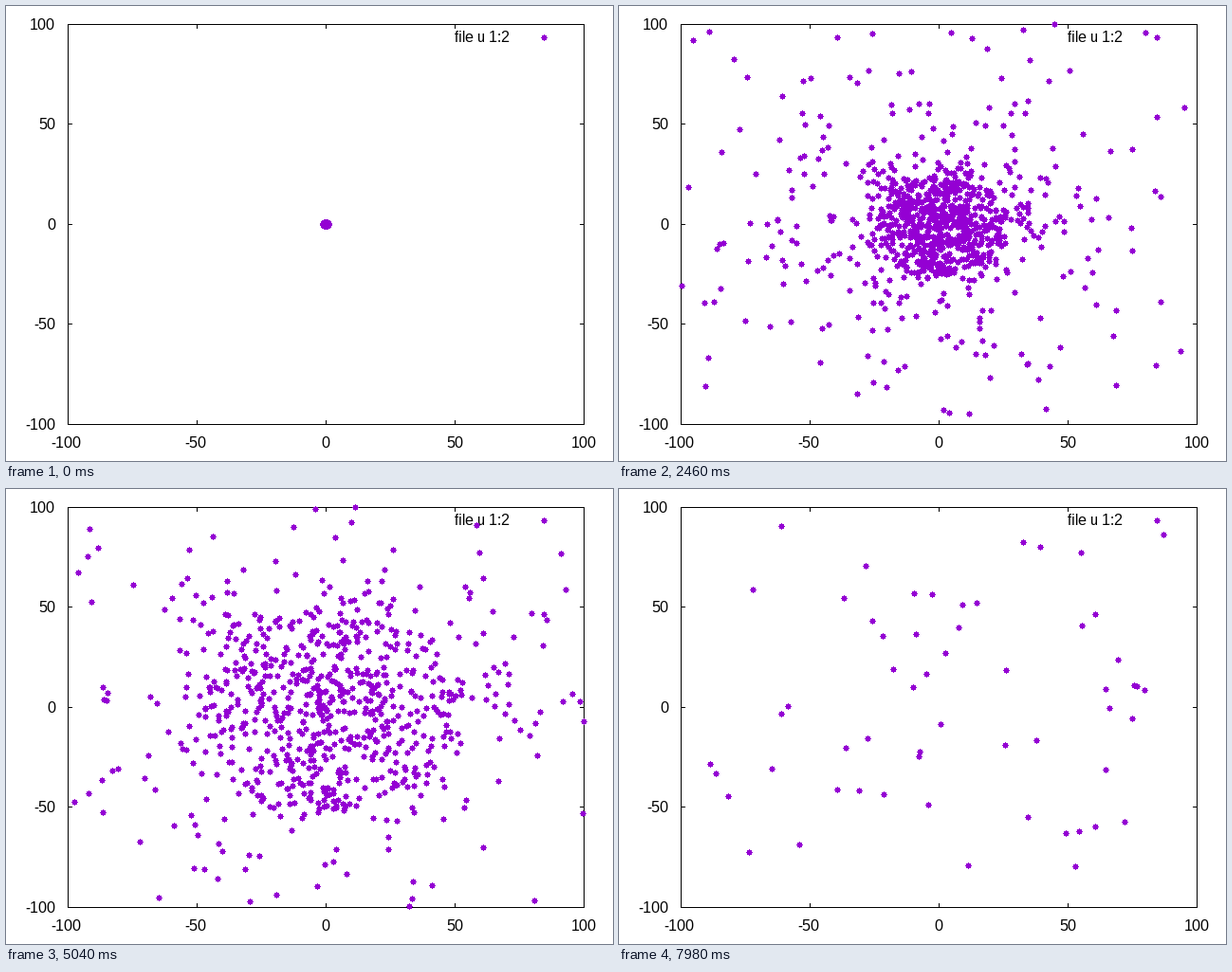
Recreate the animation shown at these times as a matplotlib script. Size 640x480 px, loop 8000 ms.

```python
import numpy as np
import matplotlib.pyplot as plt
from matplotlib.animation import FuncAnimation
from matplotlib.path import Path

plt.rcParams["text.hinting"] = "default"
plt.rcParams["text.hinting_factor"] = 1

W, H, DPI = 640, 480, 100
PX = 72 / DPI                      # one pixel in points
LEFT, RIGHT, TOP, BOTTOM = 65, 609, 19, 441
MID_X, MID_Y = (LEFT + RIGHT) / 2, (TOP + BOTTOM) / 2
SCALE_X, SCALE_Y = (RIGHT - LEFT) / 200, (BOTTOM - TOP) / 200
PURPLE = "#9400d3"
TICK_MS, LOOP_MS = 20, 8000
HOLD = 3                           # ticks per simulation step
LAST = 133                         # final simulation step
THIN_OUT = 106                     # step at which most particles vanish
CORE, TAIL, STAY = 430, 600, 57    # slow bulk, ejected, lasting particles

rng = np.random.default_rng(12)


def scatter(r):
    """Vectors of the given lengths in random directions."""
    a = rng.uniform(0, 2 * np.pi, len(r))
    return np.column_stack([r * np.cos(a), r * np.sin(a)])


# Every particle leaves a tiny disc and flies straight on
core = 0.62 * rng.random(CORE) ** 0.6 + rng.normal(0, 0.04, CORE)
tail = 0.75 * np.sqrt((1 - rng.random(TAIL)) ** -2 - 1)
stay = rng.uniform(-0.68, 0.68, (STAY, 2))
velocity = np.vstack([stay, scatter(core), scatter(tail)])
start = scatter(1.15 * np.sqrt(rng.random(len(velocity))))


def particles(step):
    p = start + velocity * step
    if step >= THIN_OUT:
        p = p[:STAY]
    return p[(np.abs(p) <= 100).all(axis=1)]


def to_px(p):
    return (np.rint(MID_X + p[:, 0] * SCALE_X),
            np.rint(MID_Y - p[:, 1] * SCALE_Y))


def dot_shape():
    """Seven-pixel dot: a 5x5 block with a tip on each side."""
    pts = [(0, -4), (1, -4), (1, -3), (3, -3), (3, -1), (4, -1), (4, 0),
           (3, 0), (3, 2), (1, 2), (1, 3), (0, 3), (0, 2), (-2, 2),
           (-2, 0), (-3, 0), (-3, -1), (-2, -1), (-2, -3), (0, -3), (0, -4)]
    return Path(pts, closed=True)


fig = plt.figure(figsize=(W / DPI, H / DPI), dpi=DPI, facecolor="white")
ax = fig.add_axes([0, 0, 1, 1])
ax.set_xlim(0, W)
ax.set_ylim(H, 0)
ax.axis("off")


def line(xs, ys):
    ax.plot(xs, ys, color="black", lw=PX, solid_capstyle="projecting",
            solid_joinstyle="miter", antialiased=False, zorder=1)


def label(x, y, text, ha):
    ax.text(x, y, text, ha=ha, va="baseline", fontsize=16 * PX,
            family="Liberation Sans", color="black", zorder=2)


line([LEFT, RIGHT, RIGHT, LEFT, LEFT], [TOP, TOP, BOTTOM, BOTTOM, TOP])
for value in range(-100, 101, 50):
    x = MID_X + value * SCALE_X
    y = int(MID_Y - value * SCALE_Y)
    line([x, x], [BOTTOM, BOTTOM - 4])
    line([x, x], [TOP, TOP + 4])
    line([LEFT, LEFT + 4], [y, y])
    line([RIGHT, RIGHT - 4], [y, y])
    label(x - (1.5 if value < 0 else 0), 466, str(value), "center")
    label(52, y + 6, str(value), "right")
label(531, 38, "file u 1:2", "right")

style = dict(ls="none", marker=dot_shape(), ms=8 * PX, mew=0, mfc=PURPLE,
             antialiased=False, zorder=3)
ax.plot([567], [33], **style)
dots, = ax.plot([], [], **style)


def draw(i):
    dots.set_data(*to_px(particles(min(i // HOLD, LAST))))
    return dots,


anim = FuncAnimation(fig, draw, frames=LOOP_MS // TICK_MS, interval=TICK_MS,
                     repeat=True, repeat_delay=0, blit=False)
plt.show()
```
